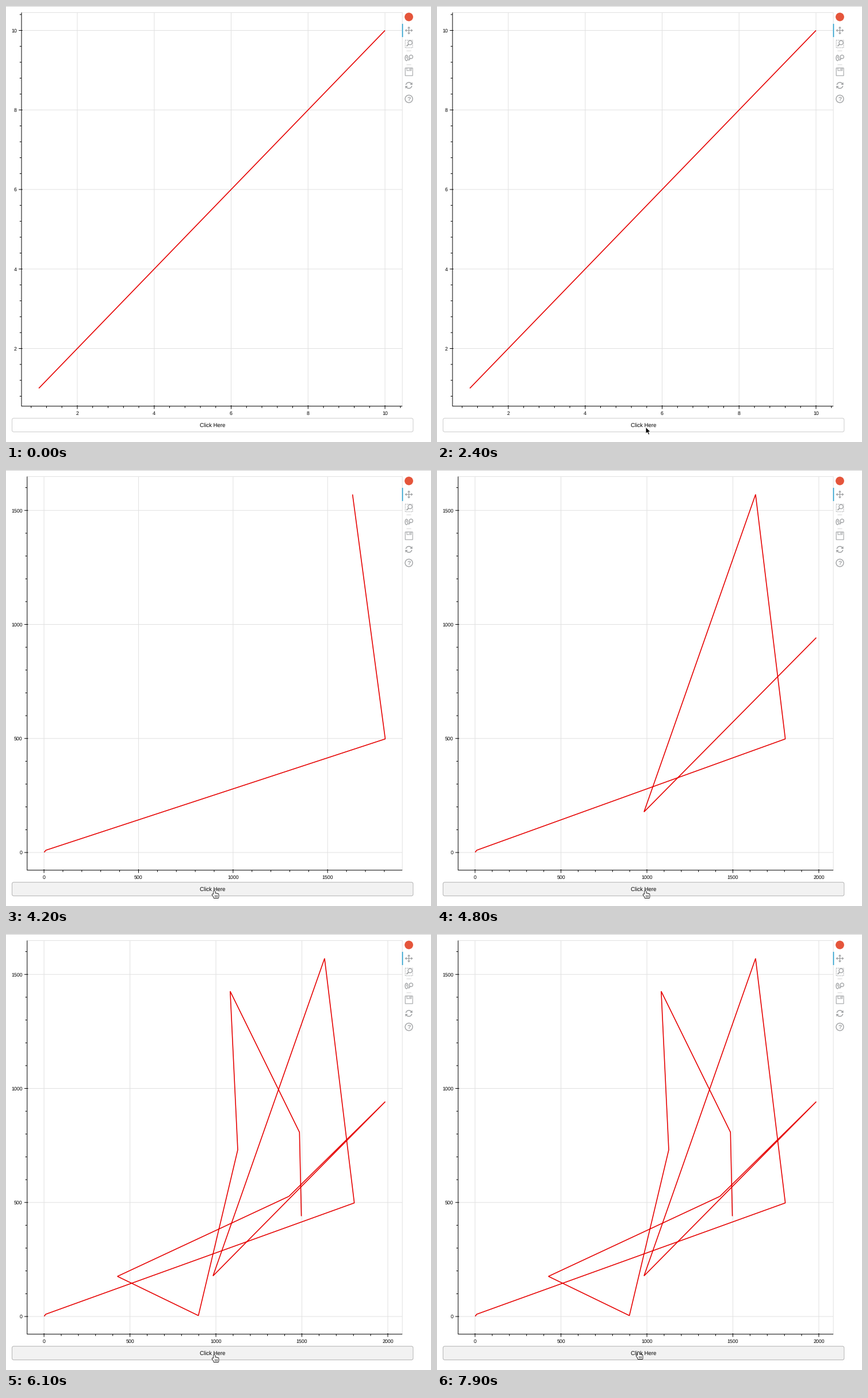
These frames come from a looping animation (739x758 px, 8000 ms). A matplotlib script:

```python
import math
import numpy as np
import matplotlib
import matplotlib.pyplot as plt
from matplotlib.animation import FuncAnimation
from matplotlib.collections import LineCollection
from matplotlib.patches import Circle, Ellipse, FancyBboxPatch, Polygon, Rectangle
from matplotlib.transforms import Affine2D

W, H, DPI = 739, 758, 100
STEP, FRAMES = 100, 80
PX = 72 / DPI
UI = 0.8  # page zoom: widget sizes below are multiples of this
RIGHT, TOP, BOTTOM = 689.1, 11.4, 695.7
BAR_X = 700.5
ICON, RED = "#a1a3a5", "#e60000"
HOVER = 3500

# One point is added per click; the later clicks fall into a steady rhythm.
POINTS = [(1805, 498), (1632, 1570), (983, 178), (1985, 942), (1425, 527), (427, 176),
          (898, 4), (1127, 731), (1083, 1426), (1486, 808), (1497, 440)]
TIMES = [HOVER, 4100, 4300, 4800, 5000, 5100, *range(5300, 6101, 200)]

# Pointer stops: time, x, y
ARROW_STOPS = [(300, 695, 737), (700, 663, 729), (800, 663, 729), (1100, 543, 719),
               (1600, 543, 719), (2200, 356, 741), (2400, 363, 732)]
HAND_STOPS = [(6700, 362.3, 731), (7000, 356, 731), (7300, 356, 731), (7900, 350.3, 726)]

matplotlib.rcParams.update({
    "font.family": "Liberation Sans",
    "text.hinting": "no_hinting",
    "toolbar": "None",
})

fig = plt.figure(figsize=(W / DPI, H / DPI), dpi=DPI, facecolor="white")
ax = fig.add_axes([0, 0, 1, 1])
ax.set_xlim(0, W)
ax.set_ylim(H, 0)
ax.axis("off")


def glide(stops, t):
    """Position at time t, easing in and out between stops."""
    ts, xs, ys = np.array(stops).T
    s = np.interp(t, ts, np.arange(len(ts)))
    k, u = divmod(s, 1)
    s = k + u * u * (3 - 2 * u)
    n = np.arange(len(ts))
    return np.interp(s, n, xs), np.interp(s, n, ys)


def stroke(xs, ys, width=1.3, color=ICON, **kw):
    kw.setdefault("solid_capstyle", "butt")
    return ax.plot(xs, ys, color=color, lw=width * PX, snap=False, **kw)[0]


def lines(color, width, z, segs=(), **kw):
    group = LineCollection(segs, colors=color, linewidths=width * PX, zorder=z, **kw)
    group.set_snap(False)
    return ax.add_collection(group, autolim=False)


def label(x, y, text, size, color="black", **kw):
    return ax.text(x, y, text, fontsize=size * PX, color=color, va="baseline", **kw)


def shape(patch):
    patch.set_snap(False)
    return ax.add_patch(patch)


def hollow(cls, *args, width=1.3, **kw):
    return shape(cls(*args, fc="white", ec=ICON, lw=width * PX, **kw))


def arrowhead(x, y, angle, size):
    """Triangle with its tip at (x, y), pointing along angle in degrees."""
    back = [math.radians(angle + turn) for turn in (140, 220)]
    shape(Polygon([(x, y)] + [(x + size * math.cos(a), y + size * math.sin(a)) for a in back],
                  fc=ICON, lw=0))


def magnifier(x, y, r, angle, handle):
    c, s = math.cos(math.radians(angle)), math.sin(math.radians(angle))
    stroke([x + r * c, x + (r + handle) * c], [y + r * s, y + (r + handle) * s], 1.8)
    hollow(Circle, (x, y), r)


def draw_toolbar():
    stroke([689.5] * 2, [31, 54], 2 * UI, "#26a0cf", zorder=5)
    shape(Circle((BAR_X, 19), 7.4, fc="#e5553b", lw=0))

    # pan
    y = 42.5
    stroke([BAR_X - 5, BAR_X + 5], [y, y])
    stroke([BAR_X, BAR_X], [y - 5, y + 5])
    for a in range(0, 360, 90):
        c, s = math.cos(math.radians(a)), math.sin(math.radians(a))
        arrowhead(BAR_X + 7 * c, y + 7 * s, a, 4)

    # box zoom
    hollow(Rectangle, (694.2, 59.4), 12.8, 13.2, width=1, ls=(0, (1.7, 1.3)))
    magnifier(702.6, 63.8, 3.6, 135, 5)

    # wheel zoom
    hollow(Ellipse, (696.4, 90.3), 4.8, 9.6)
    stroke([696.4] * 2, [87.6, 91], 1.1)
    magnifier(704.3, 88.4, 3.1, 125, 4.4)

    # save
    hollow(Rectangle, (694.2, 107.8), 12.9, 13.3, width=1.1)
    hollow(Rectangle, (697, 107.8), 7.6, 4.4, width=1)
    stroke([702.4] * 2, [108.8, 111], 1.5)

    # reset
    y = 138
    for turn in (0, 180):
        a = np.radians(np.linspace(190, 335, 30) + turn)
        stroke(BAR_X + 5.2 * np.cos(a), y + 5.2 * np.sin(a), 1.5)
        end = math.radians(turn - 8)
        arrowhead(BAR_X + 6.4 * math.cos(end), y + 6.4 * math.sin(end), turn + 45, 4.6)

    # help
    hollow(Circle, (BAR_X, 161.5), 6.5, width=1.4)
    label(BAR_X, 165.2, "?", 10.5, ICON, ha="center", weight="bold")

    for y in (78, 102):
        stroke([BAR_X - 4, BAR_X + 4], [y, y], 1, "#d4d4d4")


def draw_hand(move):
    """Pointing hand: capsules in black, then thinner ones in white."""
    fingers = [[(2 * k, 5.4 + 0.5 * k if k else 1.6), (2 * k, 12.1)] for k in range(4)]
    thumb = [[(-2.5, 7.4), (0.4, 11)]]
    creases = [[(x, 8.4), (x, 11.4)] for x in (1, 3, 5)]
    style = dict(capstyle="round", transform=move + ax.transData)
    return [lines("black", 4, 10, fingers + thumb, **style),
            lines("white", 2.4, 11, fingers + thumb, **style),
            lines("black", 0.7, 12, creases, **style)]


def tick_step(span):
    base = 10 ** math.floor(math.log10(span / 6))
    return min((m * base for m in (1, 2, 5, 10)), key=lambda s: abs(6 - span / s))


def scale(values):
    """Padded range with its major and minor ticks."""
    lo, hi = min(values), max(values)
    pad = (hi - lo) * 0.05
    lo, hi = lo - pad, hi + pad
    minor = tick_step(hi - lo) / 5
    ks = range(math.ceil(lo / minor), math.floor(hi / minor) + 1)
    return (lo, hi, [round(k * minor) for k in ks if k % 5 == 0],
            [k * minor for k in ks if k % 5])


stroke([0, W], [0.5, 0.5], 1, "#d2d2d2")
draw_toolbar()
grid = lines("#e1e1e1", 1, 1)
axis_lines = lines("black", 1, 4)
curve = stroke([], [], 2 * UI, RED, zorder=3, solid_joinstyle="bevel")
x_labels = [label(0, 711, "", 11 * UI, ha="center") for _ in range(7)]
y_labels = [label(0, 0, "", 11 * UI, ha="right") for _ in range(7)]

corner = 4 * UI
button = shape(FancyBboxPatch((10.5 + corner, 716.7 + corner), 697.4 - 2 * corner,
                              23.7 - 2 * corner, lw=PX,
                              boxstyle=f"round,pad={corner},rounding_size={corner}"))
label(359.2, 731.8, "Click Here", 12 * UI, ha="center", zorder=6)

arrow_move, hand_move = Affine2D(), Affine2D()
arrow = shape(Polygon(
    [(0, 0), (0, 11.6), (2.7, 9.1), (4.6, 13.4), (6.6, 12.5), (4.8, 8.3), (8.3, 8.3)],
    fc="black", ec="white", lw=0.9 * PX, zorder=10, transform=arrow_move + ax.transData))
hand = draw_hand(hand_move)


def draw_plot(t):
    points = [(1, 1), (10, 10)] + [p for start, p in zip(TIMES, POINTS) if t >= start]
    xs, ys = np.array(points).T
    x0, x1, xmajor, xminor = scale(xs)
    y0, y1, ymajor, yminor = scale(ys)
    digits = max(len(str(v)) for v in ymajor)
    left = 17.2 + 4.89 * digits

    def px(v):
        return left + (v - x0) / (x1 - x0) * (RIGHT - left)

    def py(v):
        return BOTTOM - (v - y0) / (y1 - y0) * (BOTTOM - TOP)

    curve.set_data(px(xs), py(ys))
    grid.set_segments(
        [[(px(v), TOP), (px(v), BOTTOM)] for v in xmajor]
        + [[(left, py(v)), (RIGHT, py(v))] for v in ymajor]
        + [[(left, TOP), (RIGHT, TOP), (RIGHT, BOTTOM)]])

    segs = [[(left, TOP), (left, BOTTOM), (RIGHT, BOTTOM)]]
    for xt, yt, inner, outer in ((xmajor, ymajor, 2 * UI, 6 * UI), (xminor, yminor, 0, 4 * UI)):
        segs += [[(px(v), BOTTOM - inner), (px(v), BOTTOM + outer)] for v in xt]
        segs += [[(left - outer, py(v)), (left + inner, py(v))] for v in yt]
    axis_lines.set_segments(segs)

    for text in x_labels + y_labels:
        text.set_text("")
    for text, v in zip(x_labels, xmajor):
        text.set_text(str(v))
        text.set_x(px(v))
    for text, v in zip(y_labels, ymajor):
        text.set_text(str(v))
        text.set_position((left - 8.4, py(v) + 3.3))


def update(i):
    t = i * STEP
    draw_plot(t)
    hover = t >= HOVER
    button.set_facecolor("#f2f2f2" if hover else "white")
    button.set_edgecolor("#b4b4b4" if hover else "#cccccc")
    arrow.set_visible(ARROW_STOPS[0][0] <= t < HOVER)
    for part in hand:
        part.set_visible(hover)
    arrow_move.clear().translate(*glide(ARROW_STOPS, t))
    hand_move.clear().translate(*glide(HAND_STOPS, t))
    return []


anim = FuncAnimation(fig, update, frames=FRAMES, interval=STEP,
                     init_func=lambda: update(0), repeat=True, repeat_delay=0)
plt.show()
```
